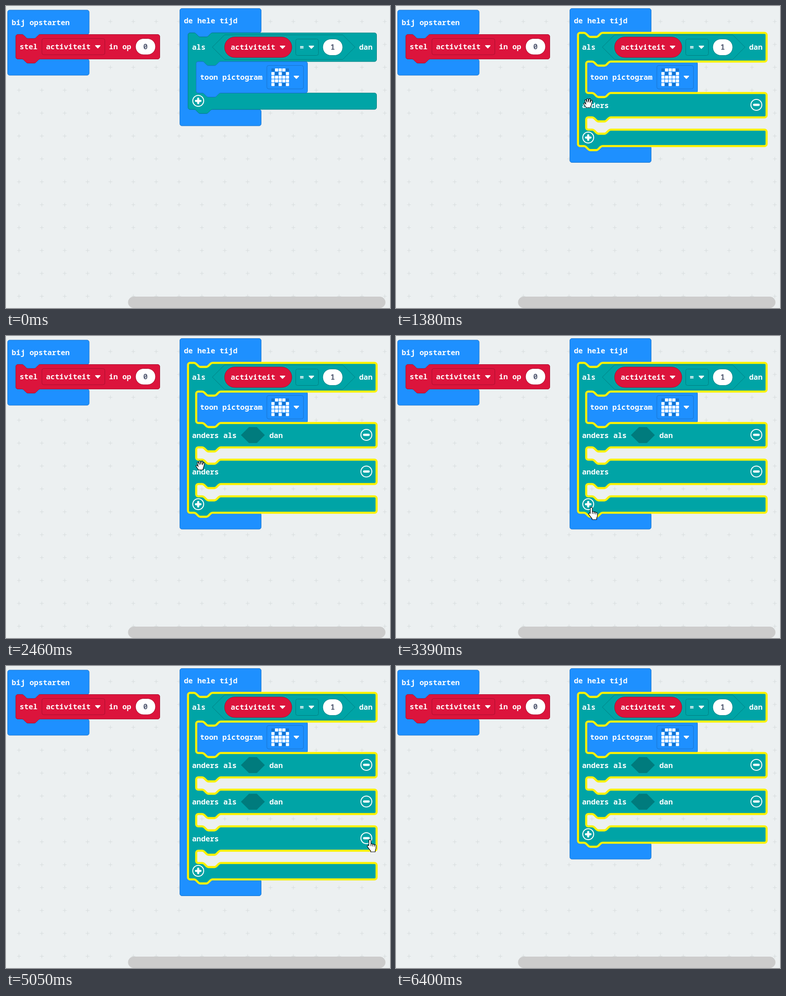
Recreate the animation shown at these times as an HTML page. Size 845x663 px, loop 7330 ms.

```html
<!DOCTYPE html>
<html lang="nl">
<head>
<meta charset="utf-8">
<title>Blokken</title>
<style>
  html, body { margin: 0; width: 100%; height: 100%; overflow: hidden; background: #ecf0f1; }
  svg { display: block; width: 845px; height: 663px; }
  text { font: bold 16.38px "Noto Sans Mono", "DejaVu Sans Mono", monospace; fill: #fff; }
  .num { fill: #575e75; text-anchor: middle; }
  .blue { fill: #1e90ff; stroke: #1873cc; }
  .red { fill: #dc143c; stroke: #a80f2e; }
  .teal { fill: #00a4a6; stroke: #007f81; }
  .white { fill: #fff; }
  .hole { fill: #007b7d; }
  .select { fill: none; stroke: #fff200; stroke-width: 4.6; stroke-linejoin: round; }
  .ring { fill: none; stroke: #fff; stroke-width: 2; }
  .sign { stroke: #fff; stroke-width: 4.8; stroke-linecap: round; }
  .hand { fill: #fff; stroke: #000; stroke-width: 1.2; stroke-linejoin: round; }
</style>
</head>
<body>
<svg viewBox="0 0 845 663">
  <defs>
    <pattern id="grid" x="3.4" y="8.9" width="50.31" height="50.27" patternUnits="userSpaceOnUse">
      <path d="M21 25.1h8.4M25.2 20.9v8.4" stroke="#d6dbdc" fill="none"/>
    </pattern>
  </defs>
  <rect width="845" height="663" fill="url(#grid)"/>
  <rect x="268.5" y="638" width="566.5" height="25" rx="12.5" fill="#ccc"/>
  <g id="start"></g>
  <g id="scenes"></g>
  <circle id="click" r="15" fill="#fff000" opacity=".5"/>
  <g id="cursor">
    <g id="point">
      <path class="hand" d="M-2.5 2c0-2.6 4.6-2.6 4.6 0v8c.6-1.3 3.6-1 3.8.8.8-1.2 3.4-.8 3.7 1 .9-1 3.6-.5 3.6 1.8v5.4c0 2-1.7 3.5-1.7 5.5v2.5h-10v-2c-2.4-2.8-4.8-6-7-9.2-1.6-2.3 1.2-4.4 3-2.2z"/>
      <path class="hand" d="M2.1 10v4.5M5.9 11v4M9.6 12v3.5"/>
    </g>
    <path id="grab" class="hand" d="M-4.5 10c-1.5-3-4-5-5.2-8-.8-2 1.6-3 3-1.4l1.7 2-2.2-7.6c-.6-2.4 2.2-3 3-.8l1.6 4-.6-6.4c0-2.4 3-2.4 3.2 0l.6 6 1.2-6c.6-2.2 3.2-1.6 3 .6l-.6 6.4 2-4.2c1-1.8 3.2-.8 2.8 1l-2 8c-.4 2.4-1.6 4-2 6.4z"/>
  </g>
</svg>
<script>
const LOOP = 7330, R = 4.5, INSET = 18, NOTCH = 13.4, NOTCH_W = 40.4, STEP = 80.5;
const $ = id => document.getElementById(id);

// Connector bump, drawn rightwards (s = 1) or leftwards (s = -1)
const notch = s => `c${2.2 * s} 0 ${3.4 * s} 1.1 ${4.5 * s} 2.2l${4.5 * s} 4.5` +
  `c${1.1 * s} 1.1 ${2.2 * s} 2.2 ${4.5 * s} 2.2h${13.4 * s}` +
  `c${2.2 * s} 0 ${3.4 * s} -1.1 ${4.5 * s} -2.2l${4.5 * s} -4.5` +
  `c${1.1 * s} -1.1 ${2.2 * s} -2.2 ${4.5 * s} -2.2`;
const arc = (sweep, dx, dy) => `a${R} ${R} 0 0 ${sweep} ${dx * R} ${dy * R}`;

// Block outline; gaps are the [top, bottom] of its mouths
function outline(x, y, w, bottom, gaps = [], linked = true) {
  const right = x + w, inner = x + INSET;
  let d = `M${x} ${y + R}${arc(1, 1, -1)}`;
  if (linked) d += `H${x + NOTCH}${notch(1)}`;
  d += `H${right - R}${arc(1, 1, 1)}`;
  for (const [a, b] of gaps) {
    d += `V${a - R}${arc(1, -1, 1)}H${inner + NOTCH + NOTCH_W}${notch(-1)}` +
      `H${inner + R}${arc(0, -1, 1)}V${b - R}${arc(0, 1, 1)}` +
      `H${inner + NOTCH}${notch(1)}H${right - R}${arc(1, 1, 1)}`;
  }
  d += `V${bottom - R}${arc(1, -1, 1)}`;
  if (linked) d += `H${x + NOTCH + NOTCH_W}${notch(-1)}`;
  return d + `H${x + R}${arc(1, -1, -1)}z`;
}

const path = (cls, d) => `<path class="${cls}" d="${d}"/>`;
const text = (x, y, s, cls = '') => `<text x="${x}" y="${y}" class="${cls}">${s}</text>`;
const box = (cls, x, y, w, h, r, extra = '') =>
  `<rect class="${cls}" x="${x}" y="${y}" width="${w}" height="${h}" rx="${r}" ${extra}/>`;
const arrow = (x, y) =>
  `<path d="M${x - 5} ${y - 2.6}h10l-5 5.2z" fill="#fff" stroke="#fff" stroke-width="2" stroke-linejoin="round"/>`;
const hexagon = (cls, x, y, w, h) =>
  path(cls, `M${x} ${y}l${h} ${-h}h${w - 2 * h}l${h} ${h}l${-h} ${h}h${2 * h - w}z`);
const button = (x, y, plus) => `<circle class="ring" cx="${x}" cy="${y}" r="12"/>` +
  path('sign', `M${x - 5} ${y}h10${plus ? `m-5 -5v10` : ''}`);

function ghost(x, y) {
  const rows = ['01110', '10101', '11111', '11111', '10101'];
  return rows.map((row, j) => [...row].map((c, i) =>
    box('', x + i * 8, y + j * 8, 6.8, 6.8, 1, `fill="${+c ? '#fff' : '#1873cc'}"`)).join('')).join('');
}

function startBlock() {
  return path('blue', outline(3.5, 9, 179.5, 152, [[62.5, 116.5]], false)) +
    path('red', outline(21.5, 62.5, 317, 116.5)) +
    text(12.5, 41.5, 'bij opstarten') + text(30, 95, 'stel') +
    box('red', 79, 71.5, 138.5, 35.5, 4) + text(88, 95, 'activiteit') + arrow(202, 89.5) +
    text(226.5, 95, 'in op') +
    box('red', 285, 71.5, 44, 35.5, 17.7, 'style="fill:#fff"') + text(307, 95, '0', 'num');
}

function condition() {
  return text(409.5, 96, 'als') + hexagon('teal', 454, 90.3, 314, 27) +
    box('red', 481, 68, 148, 45, 22.5) + text(494.5, 96, 'activiteit') + arrow(608.5, 90.5) +
    box('teal', 637.5, 72.5, 50, 36, 4) + text(646, 96, '=') + arrow(672, 90.5) +
    box('teal', 697, 72.5, 44, 36, 18, 'style="fill:#fff"') + text(719, 96, '1', 'num') +
    text(777, 96, 'dan');
}

function iconBlock() {
  return path('blue', outline(418.5, 122, 245, 191)) + text(427, 162, 'toon pictogram') +
    box('blue', 574, 130.5, 80.5, 51.5, 4) + ghost(584, 137) + arrow(639, 156.5);
}

// branches: true = "anders als", false = "anders"
function foreverBlock(branches, selected) {
  const gaps = [[122, 191]];
  let labels = '';
  branches.forEach((elseIf, i) => {
    const dy = i * STEP;
    gaps.push([244.5 + dy, 271.5 + dy]);
    labels += text(409.5, 223.7 + dy, elseIf ? 'anders als' : 'anders') + button(793, 217 + dy, false);
    if (elseIf) labels += hexagon('hole', 517, 217.5 + dy, 52.6, 17.6) + text(579.5, 223.7 + dy, 'dan');
  });
  const end = 227 + branches.length * STEP;
  const shape = outline(400.5, 59, 415, end, gaps);
  return path('blue', outline(382.5, 5.5, 179, end + 36, [[59, end]], false)) +
    text(391.5, 38, 'de hele tijd') + path('teal', shape) + condition() + iconBlock() +
    (selected ? path('select', shape) : '') + labels + button(423, end - 18.7, true);
}

const scenes = [
  [0, [], false],
  [1250, [false], true],
  [2260, [true, false], true],
  [3670, [true, true, false], true],
  [5400, [true, true], true]
];
$('start').innerHTML = startBlock();
$('scenes').innerHTML = scenes.map(s => `<g>${foreverBlock(s[1], s[2])}</g>`).join('');
const groups = [...$('scenes').children];

// Cursor moves: first change, last change, number of changes, cubic curve
const moves = [
  [70, 640, 9, [735, 562], [640, 460], [500, 300], [423, 213]],
  [1570, 1850, 5, [423.5, 213], [432, 235], [434, 265], [428, 284]],
  [2720, 3390, 10, [428, 284], [455, 330], [465, 405], [430, 376]],
  [4290, 5050, 12, [430, 376], [500, 450], [740, 452], [801, 381]]
];
const pointing = [[570, 1380], [1780, 2460], [3240, 3810], [4900, 5540]];
const clicks = [[1040, 1250], [2050, 2260], [3460, 3670], [5120, 5330]];
const within = (t, spans) => spans.some(([a, b]) => t >= a && t < b);

function cursorAt(t) {
  const [a, b, n, ...p] = moves.filter(m => t >= m[0]).pop() || moves[0];
  const step = Math.floor((t - a) / (b - a) * (n - 1) + 1e-6) + 1;
  const k = Math.max(0, Math.min(1, step / n)), u = k * k * (3 - 2 * k), v = 1 - u;
  return [0, 1].map(i => v * v * v * p[0][i] + 3 * v * v * u * p[1][i] + 3 * v * u * u * p[2][i] + u * u * u * p[3][i]);
}

const show = (el, on) => { el.style.display = on ? '' : 'none'; };

function draw(t) {
  const current = scenes.filter(s => t >= s[0]).length - 1;
  groups.forEach((g, i) => show(g, i === current));
  const [x, y] = cursorAt(t), pointer = within(t, pointing);
  $('cursor').setAttribute('transform', `translate(${x} ${y})`);
  $('click').setAttribute('transform', `translate(${x + .5} ${y - 1})`);
  show($('cursor'), t >= 70 && t < 6330);
  show($('point'), pointer);
  show($('grab'), !pointer);
  show($('click'), within(t, clicks));
}

const began = performance.now();
function tick() {
  draw((performance.now() - began) % LOOP);
  requestAnimationFrame(tick);
}
tick();
</script>
</body>
</html>
```
